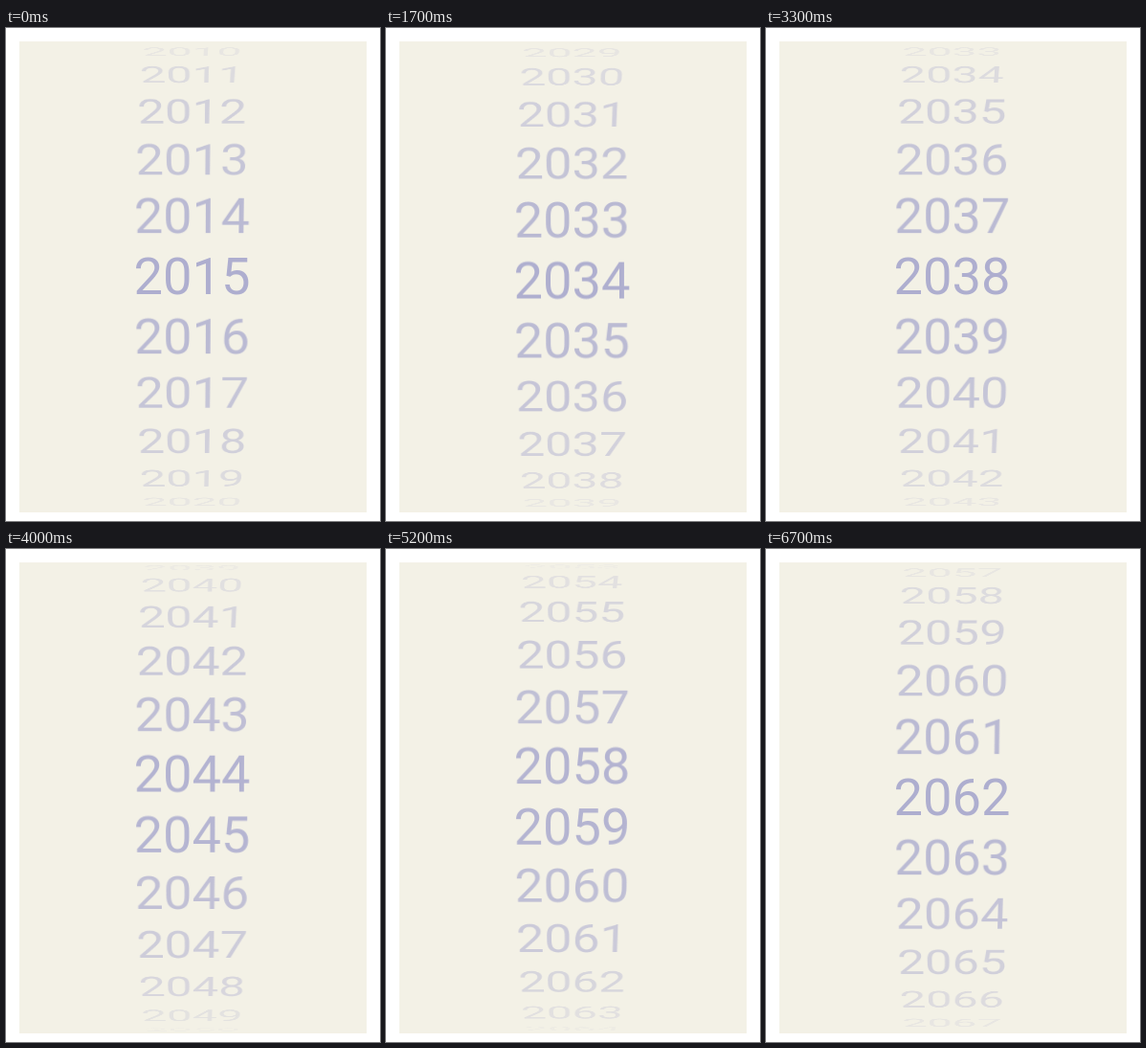
An HTML page that plays this animation: 391x515 px, repeating every 7200 ms.

```html
<!DOCTYPE html>
<html lang="en">
<head>
<meta charset="utf-8">
<title>Year wheel</title>
<style>
  html, body { margin: 0; width: 100%; height: 100%; overflow: hidden; background: #fff; }
  #panel { position: absolute; left: 14px; top: 14px; width: 363px; height: 492px; overflow: hidden; background: #f3f1e6; }
  .year {
    position: absolute; left: -1px; top: 213.7px; width: 100%; height: 64px;
    font: 54.3px/64px Roboto, sans-serif; text-align: center; color: #aeaecf;
  }
</style>
</head>
<body>
<div id="panel"></div>
<script>
const LOOP = 7200, STEP = 100;
const RADIUS = 243.4, ANGLE = 15, REACH = 6, DEPTH = 1020;
const SPINS = [
  { start: 380, duration: 2840, from: 2015, to: 2038 },
  { start: 3680, duration: 3030, from: 2038, to: 2062 },
];

const easeOut = x => 1 - Math.pow(1 - x, 2.77);
const clamp = x => Math.min(1, Math.max(0, x));

const panel = document.getElementById('panel');
const rows = Array.from({ length: 2 * REACH + 1 }, () => {
  const row = document.createElement('div');
  row.className = 'year';
  return panel.appendChild(row);
});

function yearAt(time) {
  const spin = time < SPINS[1].start ? SPINS[0] : SPINS[1];
  const progress = easeOut(clamp((time - spin.start) / spin.duration));
  return spin.from + (spin.to - spin.from) * progress;
}

function draw(time) {
  const position = yearAt(time);
  const middle = Math.round(position);
  rows.forEach((row, i) => {
    const year = middle + i - REACH;
    const offset = year - position;
    const degrees = offset * ANGLE;
    const angle = degrees * Math.PI / 180;
    const y = RADIUS * Math.sin(angle);
    const z = RADIUS * (Math.cos(angle) - 1);
    row.textContent = year;
    row.style.opacity = Math.max(0, 1 - Math.abs(offset) / REACH);
    row.style.transform =
      `translateY(${y}px) perspective(${DEPTH}px) translateZ(${z}px) rotateX(${-Math.abs(degrees)}deg)`;
  });
}

// The wheel advances in tenths of a second.
function tick() {
  draw(Math.floor(performance.now() % LOOP / STEP) * STEP);
  requestAnimationFrame(tick);
}
tick();
</script>
</body>
</html>
```
